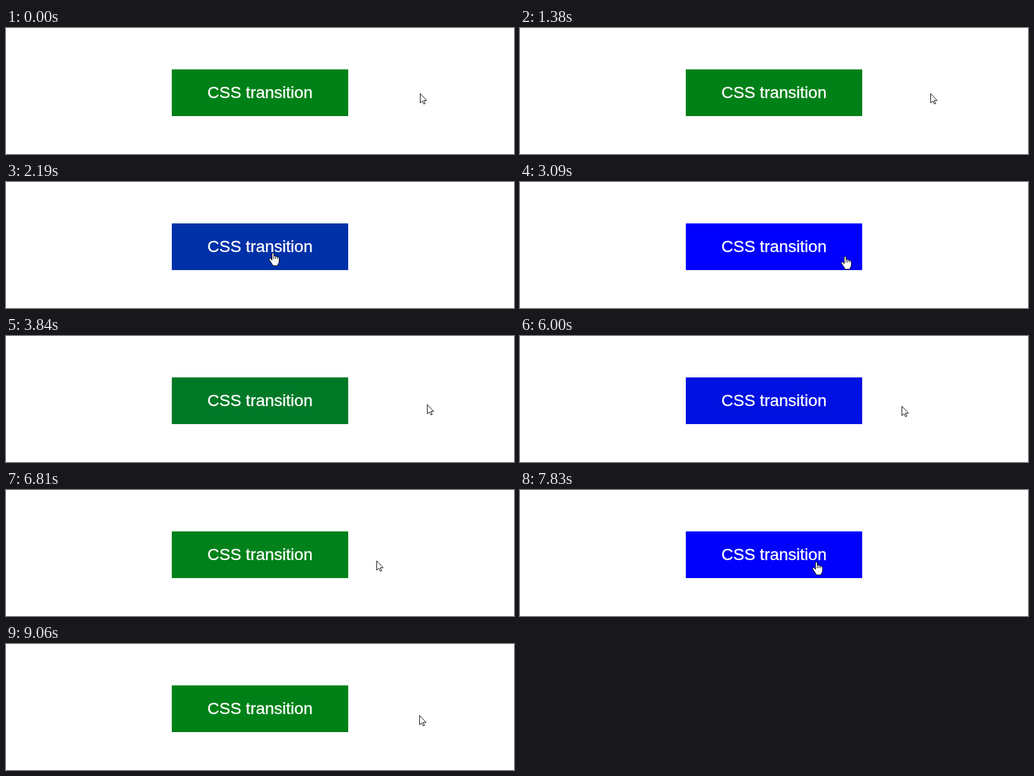
An HTML page with a canvas for the animation above (9180 ms loop, 864 px wide and 216 px high).

```html
<!DOCTYPE html>
<html lang="en">
<head>
<meta charset="utf-8">
<title>CSS transition</title>
<style>
  html, body { margin: 0; width: 100%; height: 100%; overflow: hidden; background: #fff; }
  canvas { display: block; }
</style>
</head>
<body>
<canvas id="stage" width="864" height="216"></canvas>
<script>
const ctx = document.getElementById('stage').getContext('2d');
const LOOP = 9180, STEP = 30, FADE = 1000;
const BOX = { x: 282, y: 71, w: 300, h: 80 };
const GREEN = [0, 129, 24], BLUE = [0, 0, 255];

// Each move carries the pointer from the last resting place to the next
const home = { x: 704, y: 112 };
const moves = [
  { from: 300, to: 450, x: 698, y: 112, dip: 0 },
  { from: 1480, to: 2190, x: 453, y: 121, dip: 17 },
  { from: 2790, to: 3510, x: 716, y: 117, dip: 8 },
  { from: 3960, to: 4830, x: 485, y: 119, dip: 20 },
  { from: 5610, to: 6170, x: 695, y: 120, dip: 0 },
  { from: 6460, to: 7360, x: 503, y: 123, dip: 0 },
  { from: 7830, to: 8400, x: 703, y: 122, dip: 0 }
];

const arrow = new Path2D('M.5 .5V16.5L4.2 13.1L6.6 18.4L8.9 17.4L6.5 12.3H11.5Z');
const hand = new Path2D(
  'M-.5 13V2Q-.5 .5 1 .5T2.5 2V6.5Q2.5 5.5 4 5.5T5.5 7V7.5Q5.8 6.5 7 6.5T8.5 8V8.5' +
  'Q9 7.5 10 7.8T11.5 9.5V15Q11.5 17 10.5 18.5Q9.5 20 9.5 21Q9 22.5 7 22.5H2Q.5 22.5 0 20.5' +
  'Q-1 18.5 -3 16L-5 12.5Q-6 11 -4.8 10.2Q-3.5 9.5 -2.3 11Z');
const knuckles = new Path2D('M2.5 6.5V11M5.5 7.5V11M8.5 8.5V11');

const clamp = v => Math.min(1, Math.max(0, v));
const smooth = u => u * u * (3 - 2 * u);
const mix = (a, b, k) => Math.round(a + (b - a) * k);

function pointer(t) {
  let rest = home;
  for (const m of moves) {
    if (t < m.from) break;
    const u = clamp((t - m.from) / (m.to - m.from));
    if (u < 1) {
      const k = smooth(u);
      return { x: mix(rest.x, m.x, k), y: mix(rest.y, m.y, k) + Math.round(m.dip * Math.sin(Math.PI * u)) };
    }
    rest = m;
  }
  return rest;
}

const inside = ({ x, y }) =>
  x >= BOX.x && x < BOX.x + BOX.w && y >= BOX.y && y < BOX.y + BOX.h;

const crossings = [];
for (let t = 10, was = false; t < LOOP; t += 10) {
  const over = inside(pointer(t));
  if (over !== was) crossings.push({ t, over });
  was = over;
}

// CSS "ease": cubic-bezier(.25, .1, .25, 1)
function ease(p) {
  if (p >= 1) return 1;
  let lo = 0, hi = 1, s = 0;
  for (let n = 0; n < 24; n++) {
    s = (lo + hi) / 2;
    if (.75 * s * (1 - s) + s ** 3 < p) lo = s; else hi = s;
  }
  return .3 * s * (1 - s) ** 2 + 3 * s * s * (1 - s) + s ** 3;
}

function blueness(t) {
  const last = crossings.filter(c => c.t <= t).pop();
  if (!last) return 0;
  const k = ease((t - last.t) / FADE);
  return last.over ? k : 1 - k;
}

function outline(shape) {
  ctx.fillStyle = '#fff';
  ctx.strokeStyle = '#000';
  ctx.lineWidth = 1;
  ctx.fill(shape);
  ctx.stroke(shape);
}

function drawButton(k) {
  ctx.fillStyle = `rgb(${GREEN.map((g, i) => mix(g, BLUE[i], k))})`;
  ctx.fillRect(BOX.x, BOX.y, BOX.w, BOX.h);

  ctx.fillStyle = ctx.strokeStyle = '#fff';
  ctx.font = '28px "Liberation Sans", Arial, sans-serif';
  ctx.textAlign = 'center';
  ctx.lineWidth = .4;
  ctx.fillText('CSS transition', 432, 120);
  ctx.strokeText('CSS transition', 432, 120);
}

function drawPointer(at) {
  ctx.save();
  ctx.translate(at.x, at.y);
  if (inside(at)) {
    outline(hand);
    ctx.stroke(knuckles);
  } else {
    outline(arrow);
  }
  ctx.restore();
}

function draw(t) {
  ctx.fillStyle = '#fff';
  ctx.fillRect(0, 0, 864, 216);
  drawButton(blueness(t));
  drawPointer(pointer(t));
}

const start = performance.now();
function tick() {
  const t = (performance.now() - start) % LOOP;
  draw(Math.floor(t / STEP) * STEP);
  requestAnimationFrame(tick);
}
tick();
</script>
</body>
</html>
```
